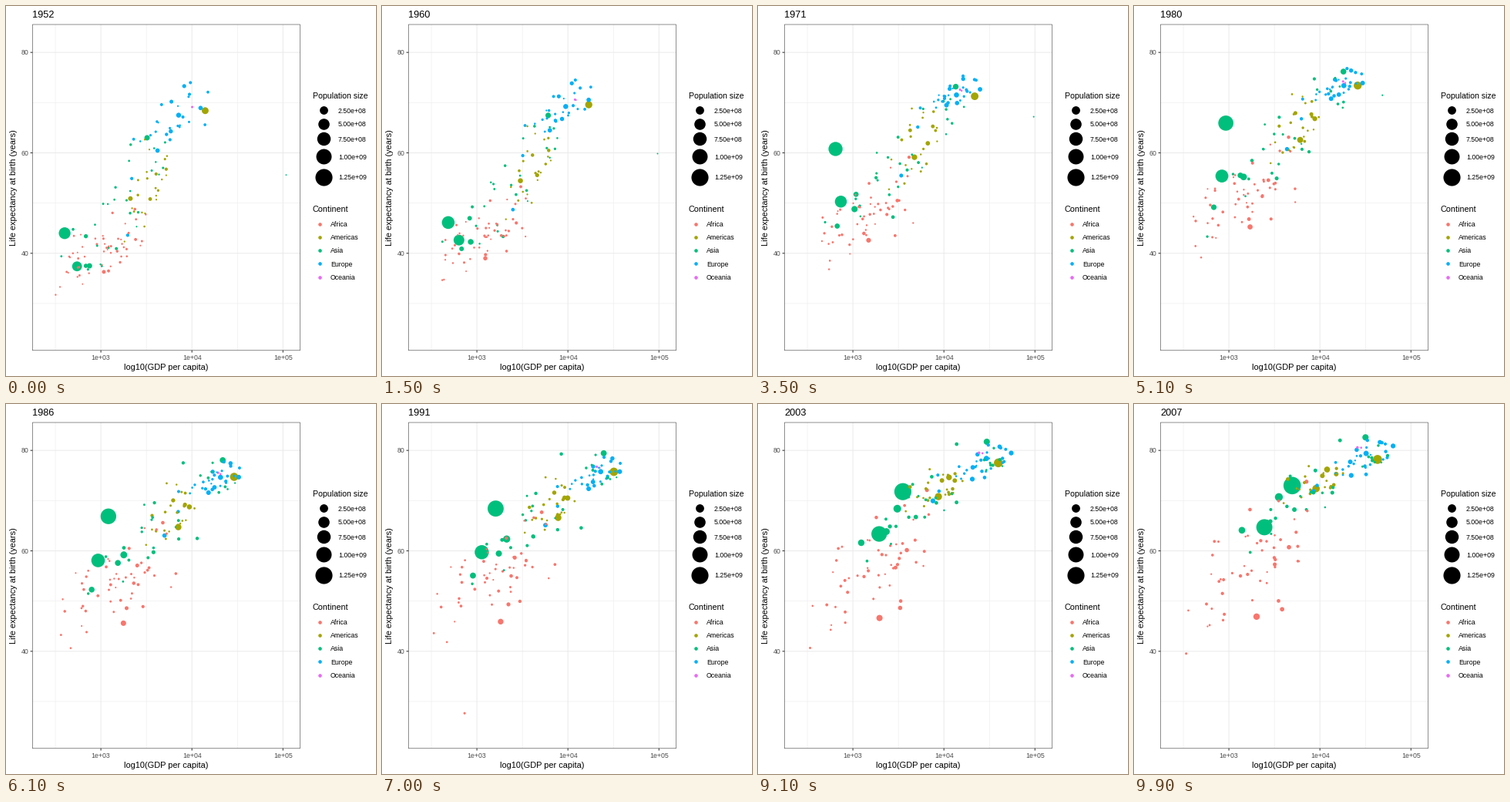
Write a matplotlib script that moves like this. It is 480 px wide and 480 px high and loops after 10 s.

```python
import numpy as np
import matplotlib.pyplot as plt
from matplotlib.animation import FuncAnimation
from matplotlib.patches import Rectangle

plt.rcParams["font.family"] = "Liberation Sans"

SIZE, FRAMES = 480, 100
LEFT, RIGHT, TOP, BOTTOM = 34.4, 381.5, 24.0, 446.8
COLORS = {"Africa": "#F8766D", "Americas": "#A3A500", "Asia": "#00BF7D",
          "Europe": "#00B0F6", "Oceania": "#E76BF3"}
T = np.arange(FRAMES) / (FRAMES - 1)
YEARS = 1952 + 55 * T
MIN_POP, MAX_POP = 0.06, 1318.7  # millions
MM = 72 / 25.4


def x_px(log_gdp):
    return 123.1 + (log_gdp - 3) * 118.1


def y_px(life):
    return 60.2 + (80 - life) * 6.515


def point_size(pop):
    share = np.clip((np.asarray(pop, float) - MIN_POP) / (MAX_POP - MIN_POP), 0, 1)
    return 0.1 + 9.9 * np.sqrt(share)


def diameter(size):
    return 0.75 * (MM * size + 0.94) + 0.7


def along(knots):
    """Linear path through knots evenly spaced over the loop."""
    return np.interp(T, np.linspace(0, 1, len(knots)), knots)


dots = []


def dot(region, pops, *path, dip=(0, 0)):
    """path holds gdp, life pairs; dip is the year and depth of a crisis."""
    year, depth = dip
    life = along(path[1::2]) - depth * np.clip(1 - abs(YEARS - year) / 5, 0, 1)
    dots.append((x_px(along(np.log10(path[0::2]))), y_px(life),
                 diameter(along(point_size(pops))), COLORS[region]))


# The few dots that stand out get their own path.
dot("Asia", (556, 960, 1319), 400, 44, 515, 46.8, 690, 65, 1150, 66.6,
    2150, 70, 4959, 73)
dot("Asia", (372, 670, 1110), 547, 37.4, 667, 44.3, 760, 52.1, 900, 57.8,
    1380, 61.4, 2452, 64.7)
dot("Asia", (0.2, 2.5), 108382, 55.6, 93000, 61.2, 98000, 69, 29000, 73.3,
    39500, 75.8, 47307, 77.6)
dot("Asia", (86, 127), 3217, 63, 13000, 72.8, 23900, 79, 31656, 82.6)
dot("Asia", (82, 224), 750, 37.5, 1000, 48, 1980, 61.2, 3541, 70.7)
dot("Asia", (41, 169), 684, 43.4, 1310, 55.2, 2606, 65.5)
dot("Asia", (47, 150), 684, 37.5, 668, 48.7, 1391, 64.1)
dot("Asia", (4.7, 14), 368, 39.4, 560, 49, 1714, 59.7, dip=(1977, 18))
dot("Americas", (158, 301), 13990, 68.4, 21300, 71, 30700, 75.4, 42952, 78.2)
dot("Americas", (57, 190), 2109, 50.9, 4600, 58.7, 7650, 65.8, 9066, 72.4)
dot("Americas", (30, 109), 3478, 50.8, 8700, 66.5, 11978, 76.2)
dot("Europe", (69, 82), 7144, 67.5, 18000, 73.2, 32170, 79.4)
dot("Europe", (22, 71), 1969, 43.6, 4260, 60.4, 8458, 71.8)
dot("Africa", (33, 135), 1077, 36.3, 1700, 45.2, 2014, 46.9)
dot("Africa", (2.5, 8.9), 493, 40, 863, 46.2, dip=(1992, 21.5))

rng = np.random.default_rng(1952)


def crowd(region, count, pop, growth, *stages, link=0.75):
    """Smaller countries; each stage is mean and spread of log gdp and of life."""
    for _ in range(count):
        rich, luck = np.clip(rng.normal(0, 1, 2), -1.8, 1.8)
        fit = link * rich + np.sqrt(1 - link ** 2) * luck
        path = []
        for gdp, gdp_sd, life, life_sd in stages:
            dx, dy = rng.normal(0, 0.25, 2)
            path += [10 ** (gdp + gdp_sd * (rich + dx)),
                     min(life + life_sd * (fit + dy), 82)]
        start = pop * np.exp(np.clip(rng.normal(), -2, 1.7))
        dot(region, (start, start * growth), *path)


crowd("Africa", 50, 2.8, 3.3, (2.98, .25, 39, 4.2), (3.1, .28, 45.5, 5),
      (3.12, .32, 53, 6), (3.2, .36, 55, 7.5), link=0.5)
crowd("Americas", 22, 3.5, 3, (3.5, .18, 53.5, 7.5), (3.7, .2, 61.5, 6.5),
      (3.8, .2, 68.5, 4.5), (3.95, .25, 73.5, 2.8))
crowd("Asia", 25, 6, 3.2, (3.1, .32, 46, 7.5), (3.4, .38, 55.5, 7),
      (3.6, .42, 64.5, 6.5), (3.8, .46, 71, 5))
crowd("Europe", 28, 9, 1.3, (3.72, .22, 65.5, 4.5), (4.03, .18, 70.8, 2),
      (4.22, .18, 74, 2), (4.4, .22, 77.7, 2.4))
crowd("Oceania", 2, 4, 2.2, (4.01, .01, 69.2, .2), (4.28, .04, 74, .5),
      (4.47, .07, 80.7, .5))

dots.sort(key=lambda d: -d[2][0])
X, Y, D = (np.array([d[k] for d in dots]) for k in range(3))

fig = plt.figure(figsize=(SIZE / 72, SIZE / 72), dpi=72, facecolor="white")
ax = fig.add_axes([0, 0, 1, 1])
ax.set(xlim=(0, SIZE), ylim=(SIZE, 0))
ax.axis("off")


def line(xs, ys, color, width):
    ax.plot(xs, ys, color=color, lw=width, solid_capstyle="butt", snap=False, zorder=1)


def label(x, y, text, size=8.8, color="black", **kw):
    return ax.text(x, y, text, fontsize=size, color=color, **kw)


def grid(xs, ys, width):
    for x in x_px(np.array(xs)):
        line([x, x], [TOP, BOTTOM], "#EBEBEB", width)
    for y in y_px(np.array(ys)):
        line([LEFT, RIGHT], [y, y], "#EBEBEB", width)


grid((2.5, 3.5, 4.5), (30, 50, 70), 0.53)
grid((3, 4, 5), (40, 60, 80), 1.07)
for v in (3, 4, 5):
    line([x_px(v)] * 2, [BOTTOM, BOTTOM + 2.75], "#333333", 1.07)
    label(x_px(v), 459.2, f"1e+0{v}", color="#4D4D4D", ha="center")
for v in (40, 60, 80):
    line([LEFT - 2.75, LEFT], [y_px(v)] * 2, "#333333", 1.07)
    label(29.4, y_px(v) + 3.2, str(v), color="#4D4D4D", ha="right")

label(207.5, 472, "log10(GDP per capita)", 11, ha="center")
label(10.2, 235.4, "Life expectancy at birth (years)", 11,
      rotation=90, ha="center", va="center")

# Legend keys are as tall as their point, but never below KEY.
KEY, KEY_X = 17.28, 398
label(KEY_X, 120, "Population size", 10.5)
top = 126.8
for pop in range(250, 1251, 250):
    size = point_size(pop)
    height = max(KEY, MM * size)
    y = top + height / 2
    top += height
    ax.scatter(KEY_X + 13.8, y, s=diameter(size) ** 2, c="black", lw=0)
    label(431, y + 3.2, f"{pop * 1e6:.2e}")

label(KEY_X, 267, "Continent", 10.7)
for k, (name, color) in enumerate(COLORS.items()):
    y = 282.5 + KEY * k
    ax.scatter(KEY_X + KEY / 2, y, s=diameter(1.5) ** 2, c=color, lw=0)
    label(421, y + 3.2, name)

points = ax.scatter(X[:, 0], Y[:, 0], s=D[:, 0] ** 2, c=[d[3] for d in dots],
                    lw=0, zorder=3)
ax.add_patch(Rectangle((LEFT, TOP), RIGHT - LEFT, BOTTOM - TOP, fill=False,
                       ec="#333333", lw=0.55, snap=False, zorder=4))
title = label(34.4, 15, "1952", 12.8)


def update(i):
    points.set_offsets(np.column_stack([X[:, i], Y[:, i]]))
    points.set_sizes(D[:, i] ** 2)
    title.set_text(str(int(YEARS[i] + 0.5)))
    return points, title


anim = FuncAnimation(fig, update, frames=FRAMES, interval=100, repeat=True,
                     repeat_delay=0)
plt.show()
```
